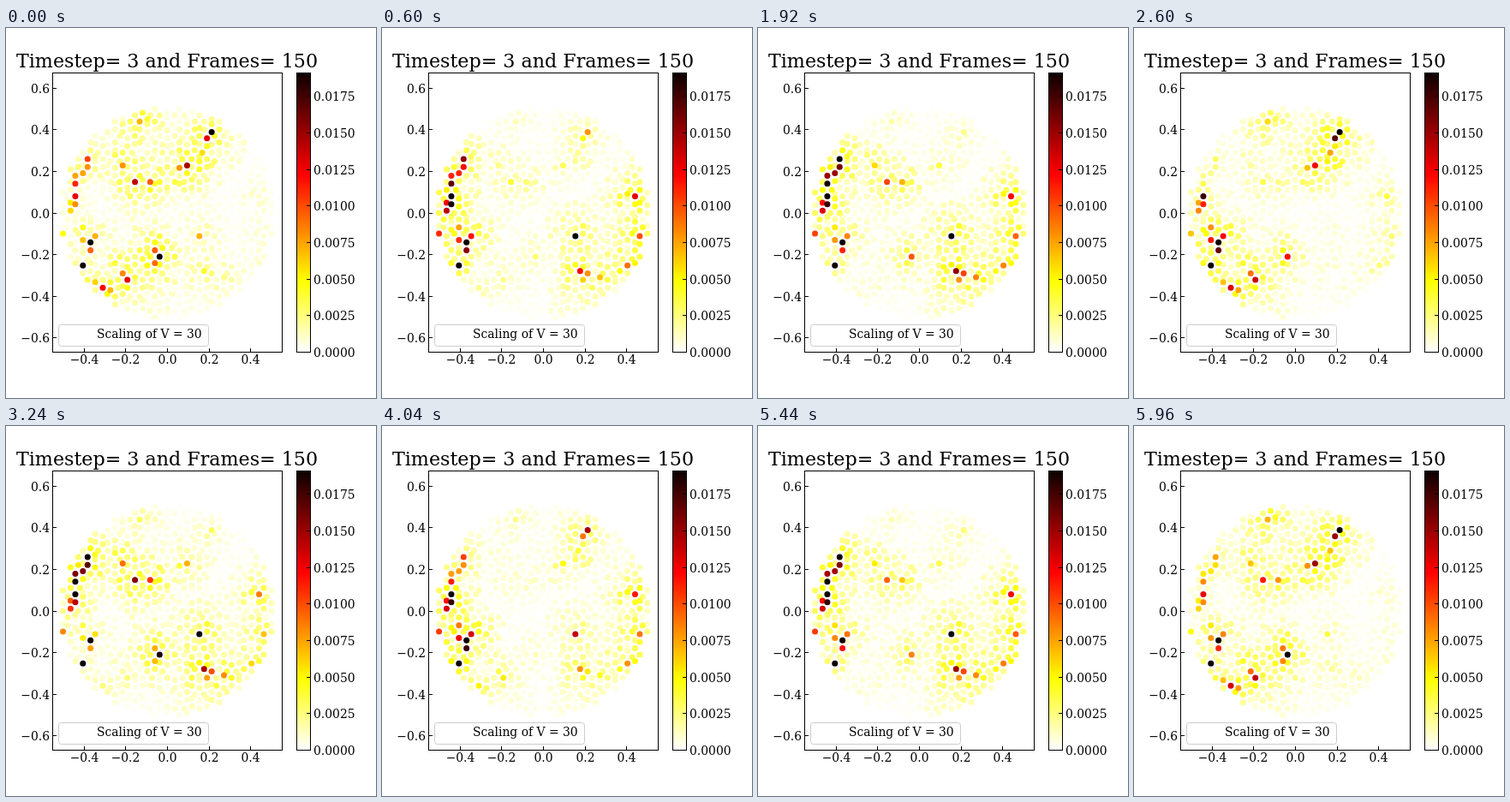
An HTML page for the animation above (6000 ms loop, 432x432 px).

```html
<!DOCTYPE html>
<html lang="en">
<head>
<meta charset="utf-8">
<title>Penrose lattice density</title>
<style>
  html, body { margin: 0; width: 100%; height: 100%; overflow: hidden; background: #fff; }
  svg { display: block; width: 432px; height: 432px; }
  text { font-family: "DejaVu Serif", "Noto Serif", serif; font-size: 13.89px; fill: #000; }
  .title { font-size: 22.2px; text-anchor: middle; }
  .line { fill: none; stroke: #000; stroke-width: 1; }
</style>
</head>
<body>
<svg viewBox="0 0 432 432">
  <defs>
    <linearGradient id="heat" x1="0" y1="1" x2="0" y2="0">
      <stop offset="0" stop-color="#fff"/>
      <stop offset=".254" stop-color="#ff0"/>
      <stop offset=".635" stop-color="#f00"/>
      <stop offset="1" stop-color="#0b0000"/>
    </linearGradient>
  </defs>
  <g id="dots"></g>
  <rect x="339" y="52" width="16" height="326" fill="url(#heat)"/>
  <rect class="line" x="339.5" y="52.5" width="16" height="326"/>
  <rect class="line" x="54.5" y="52.5" width="268" height="326"/>
  <g id="axes"></g>
  <rect x="61.5" y="346.5" width="175" height="25" rx="3" fill="#fff" fill-opacity=".8" stroke="#ccc"/>
  <text x="106" y="362">Scaling of V = 30</text>
  <text class="title" x="188" y="46">Timestep= 3 and Frames= 150</text>
</svg>
<script>
const PHI = (1 + Math.sqrt(5)) / 2, TAU = 2 * Math.PI;
const LOOP = 6000, STEP = 40, PERIOD = 1180, TOP = 19.1;

// Clusters of strong sites: peak phase, resting share, then x, y, peak (in thousandths)
const clusters = [
  [.17, .06, [240,121,28, 234,129,17, 229,146,7.5]],
  [.05, .2, [211,160,15, 202,163,8, 156,110,7]],
  [.85, 0, [150,180,17.5, 168,180,12, 136,160,10]],
  [.71, .14, [71,170,22, 81,173,16, 95,153,22, 95,162,17, 89,170,16, 81,182,24]],
  [.52, .42, [81,196,30, 81,206,19, 75,204,12.5, 75,213,14, 66,240,11]],
  [.34, .35, [98,250,58, 98,259,18.5, 104,243,14, 89,233,9, 89,247,13, 89,277,50]],
  [.12, .05, [113,302,14, 122,305,8, 141,293,14.5, 136,286,9.5, 104,296,7]],
  [.93, .05, [179,267,26, 173,259,10, 173,274,9.5]],
  [.67, 0, [225,242,27, 231,283,15.5, 240,286,10.5, 235,294,8, 254,290,8.5]],
  [.54, .06, [295,196,13, 301,243,10, 286,277,9]]
];
const seeds = clusters.flatMap(([phase, rest, v]) =>
  v.flatMap((x, i) => i % 3 ? [] : [{ x, y: v[i + 1], peak: v[i + 2], phase, rest }]));

const unit = turns => [...Array(5).keys()].map(j => {
  const a = TAU * (.25 + j * turns / 5);
  return [Math.cos(a), Math.sin(a)];
});
const edges = unit(1), conj = unit(2);
const project = (n, basis) => [0, 1].map(c => n.reduce((sum, k, j) => sum + k * basis[j][c], 0));

// Cut and project: pentagonal window for each vertex class
function inWindow(n) {
  const s = n.reduce((a, b) => a + b);
  if (s < -1 || s > 2) return false;
  const size = s === 0 || s === 1 ? PHI : 1;
  const sign = s === 0 || s === 2 ? -1 : 1;
  const [x, y] = project(n, conj);
  return conj.every(([cx, cy]) => -sign * (x * cx + y * cy) < size * PHI / 2);
}

function penrose(radius) {
  const queue = [[0, 0, 0, 0, 0]], seen = new Set([String(queue[0])]), out = [];
  for (let i = 0; i < queue.length; i++) {
    const n = queue[i], [x, y] = project(n, edges);
    if (Math.hypot(x, y) < radius) out.push([188.2 + 9.33 * x, 216 - 9.2 * y]);
    for (let j = 0; j < 5; j++) for (const d of [-1, 1]) {
      const m = n.slice();
      m[j] += d;
      const key = String(m);
      if (seen.has(key) || !inWindow(m) || Math.hypot(...project(m, edges)) > radius + 2) continue;
      seen.add(key);
      queue.push(m);
    }
  }
  return out;
}

let state = 11;
const random = () => (state = state * 16807 % 2147483647) / 2147483647;

const gap = (s, x, y) => Math.hypot(s.x - x, s.y - y);
const sites = penrose(13.35).map(([x, y]) => {
  const near = seeds.reduce((a, b) => gap(a, x, y) < gap(b, x, y) ? a : b);
  const d = gap(near, x, y), r = random();
  if (d < 2.8) return { ...near, x, y };
  const peak = .3 + .9 * r + (1 + 4 * r) * Math.exp(-d * d / 500);
  return { x, y, peak, phase: near.phase, rest: .2 };
}).sort((a, b) => a.peak - b.peak);

const NS = "http://www.w3.org/2000/svg";
function add(parent, tag, attrs, text = "") {
  const el = document.createElementNS(NS, tag);
  for (const k in attrs) el.setAttribute(k, attrs[k]);
  el.textContent = text;
  document.getElementById(parent).append(el);
  return el;
}

const label = v => v.toFixed(1).replace("-", "\u2212");
const tick = d => add("axes", "path", { d, class: "line" });
for (let i = -2; i <= 2; i++) {
  const x = Math.round(188 + i * 48.6) + .5;
  tick(`M${x} 378v-4`);
  add("axes", "text", { x, y: 392, "text-anchor": "middle" }, label(i * .2));
}
for (let i = -3; i <= 3; i++) {
  const y = Math.round(215.5 - i * 48.6) + .5;
  tick(`M55 ${y}h4`);
  add("axes", "text", { x: 51, y: y + 5, "text-anchor": "end" }, label(i * .2));
}
for (let i = 0; i <= 7; i++) {
  const y = Math.round(377.8 - i * 42.65) + .5;
  tick(`M355 ${y}h-4`);
  add("axes", "text", { x: 359, y: y + 5 }, (i * .0025).toFixed(4));
}

for (const s of sites) s.el = add("dots", "circle", { cx: s.x, cy: s.y, r: 3.5 });

function heat(value) {
  const u = 1 - Math.min(1, value / TOP);
  const ch = v => Math.round(255 * Math.max(0, Math.min(1, v)));
  return `rgb(${ch(.0416 + u / .365 * .958)},${ch((u - .365) / .381)},${ch((u - .746) / .254)})`;
}

let last = -1;
function draw(now) {
  const step = Math.floor(now % LOOP / STEP);
  if (step !== last) {
    last = step;
    const turn = step * STEP / PERIOD;
    for (const s of sites) {
      const wave = .5 + .5 * Math.cos(TAU * (turn - s.phase));
      s.el.setAttribute("fill", heat(s.peak * (s.rest + (1 - s.rest) * wave)));
    }
  }
  requestAnimationFrame(draw);
}
draw(performance.now());
</script>
</body>
</html>
```
